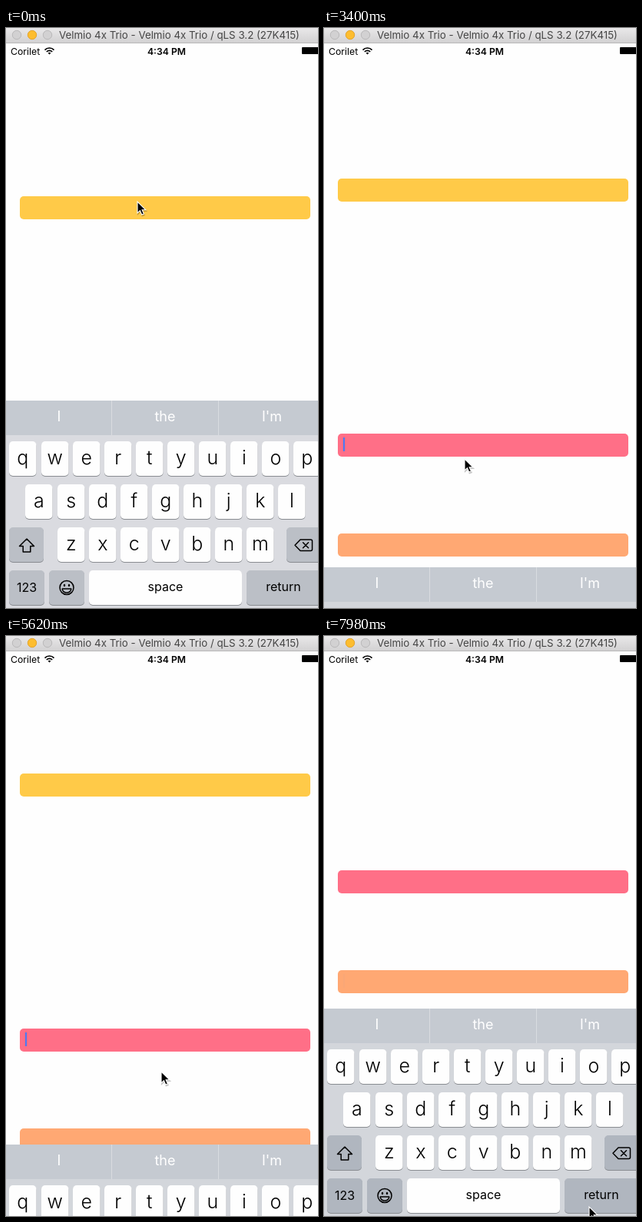
Recreate the animation shown at these times as an HTML page. Size 406 px wide and 755 px high, loop 8000 ms.

```html
<!DOCTYPE html>
<html lang="en">
<head>
<meta charset="utf-8">
<style>
  html, body { margin: 0; width: 100%; height: 100%; overflow: hidden; background: #fefefe; }
  svg { display: block; font-family: Inter, "Liberation Sans", sans-serif; }
  .mid { text-anchor: middle; }
  .letter { font-size: 25px; font-weight: 300; }
  .label { font-size: 16px; }
  .hint { font-size: 18px; fill: #fff; }
  .line { fill: none; stroke: #000; stroke-width: 1.5; stroke-linejoin: round; stroke-linecap: round; }
  #keys { --bg: #d3d6db; --dark: #b0b6bf; }
  #keys.light { --bg: #dadbe0; --dark: #bbbfc6; }
  .bg { fill: var(--bg); }
  .dark { fill: var(--dark); }
</style>
</head>
<body>
<svg width="406" height="755" viewBox="0 0 406 755">
  <defs>
    <linearGradient id="chrome" x2="0" y2="1">
      <stop stop-color="#e9e8e9"/><stop offset="1" stop-color="#d1d0d1"/>
    </linearGradient>
  </defs>
  <rect width="406" height="755" fill="#fefefe"/>

  <g id="page">
    <rect x="18" y="219" width="378" height="30" rx="5" fill="#ffca48"/>
    <rect x="18" y="551" width="378" height="30" rx="5" fill="#ff6f87"/>
    <rect x="18" y="681" width="378" height="30" rx="5" fill="#ffa873"/>
    <rect id="caret" x="25" width="2" height="18" fill="#4a78f4"/>
  </g>

  <g id="keys"></g>

  <!-- status bar -->
  <text x="6" y="35" font-size="12.3">Corilet</text>
  <g fill="none" stroke="#000" stroke-width="1.7">
    <path d="M50.5 28.6a8.2 8.2 0 0 1 12 0M52.8 31a5.2 5.2 0 0 1 7.4 0"/>
    <path d="M54.6 32.6a2.8 2.8 0 0 1 3.8 0l-1.9 2z" fill="#000" stroke="none"/>
  </g>
  <text x="209" y="35" class="mid" font-size="12.2" font-weight="600">4:34 PM</text>
  <rect x="385" y="25" width="23" height="9" rx="1"/>

  <!-- window title -->
  <rect width="406" height="20" fill="url(#chrome)"/>
  <rect y="19" width="406" height="1" fill="#b9b8b9"/>
  <g fill="#d2d1d2" stroke="#bab9ba">
    <circle cx="14" cy="9" r="5.7"/>
    <circle cx="34" cy="9" r="5.7" fill="#fdbd2f" stroke="#e3a32a"/>
    <circle cx="54" cy="9" r="5.7"/>
  </g>
  <text x="69" y="14" font-size="13.3" fill="#454545">Velmio 4x Trio - Velmio 4x Trio / qLS 3.2 (27K415)</text>

  <g id="mouse">
    <path d="M0 0v14.8l3.4-3.1 2.3 5.3 2.7-1.1-2.3-5.2h4.6z" opacity=".22" transform="translate(.6 1.6)" stroke="#000" stroke-width="1.5"/>
    <path d="M0 0v14.8l3.4-3.1 2.3 5.3 2.7-1.1-2.3-5.2h4.6z" stroke="#fff" stroke-width="1.1"/>
  </g>
</svg>
<script>
const $ = id => document.getElementById(id);
const LOOP = 8000, STEP = 147.8, KEYBOARD = 270;

// The keyboard is laid out at its raised position.
const text = (x, y, cls, s) => `<text x="${x}" y="${y}" class="mid ${cls}">${s}</text>`;
const key = (x, y, w, dark) =>
  `<rect x="${x}" y="${y + 1}" width="${w}" height="45" rx="5" fill="#898c91"/>` +
  `<rect x="${x}" y="${y}" width="${w}" height="45" rx="5" ${dark ? 'class="dark"' : 'fill="#fefefe"'}/>`;

function letterRow(letters, left, y) {
  return [...letters].map((c, i) => {
    const x = Math.round(left + i * 41.1);
    return key(x, y, 35.5, false) + text(x + 17.8, y + 29.5, "letter", c);
  }).join("");
}

$("keys").innerHTML =
  `<rect y="485" width="406" height="270" class="bg"/>
   <rect y="485" width="406" height="45" fill="#c5cad1"/>
   <path d="M137.5 485v45M276.5 485v45" stroke="#d9dce0"/>` +
  text(69, 512, "hint", "I") + text(207, 512, "hint", "the") + text(346, 512, "hint", "I'm") +
  letterRow("qwertyuiop", 4.45, 538) + letterRow("asdfghjkl", 25.45, 594) + letterRow("zxcvbnm", 66.55, 650) +
  key(4, 650, 45, true) + key(365, 650, 46, true) +
  key(4, 706, 46, true) + key(56, 706, 46, true) + key(108, 706, 199, false) + key(313, 706, 98, true) +
  text(27, 734, "label", "123") + text(207.5, 733, "label", "space") + text(361, 733, "label", "return") +
  `<path class="line" d="M27 665l9.5 9.5h-4.7v7.5h-9.6v-7.5h-4.7z"/>
   <path class="line" d="M383 666h13.5a2 2 0 0 1 2 2v10.5a2 2 0 0 1-2 2h-13.5l-7-7.2zM386.5 669.8l7 7m0-7l-7 7"/>
   <circle class="line" cx="79" cy="728.5" r="9"/>
   <path class="line" d="M73.2 730h11.6a5.8 5.2 0 0 1-11.6 0z"/>
   <ellipse cx="76" cy="725.5" rx="1.2" ry="1.8"/><ellipse cx="82" cy="725.5" rx="1.2" ry="1.8"/>`;

// y: resting top of the focused bar, lift: how far the page scrolls for it
const yellow = { y: 219, lift: 0 }, pink = { y: 551, lift: 116 }, orange = { y: 681, lift: 246 };
const sessions = [
  { show: -660, hide: 680, bar: yellow },
  { show: 1530, hide: 2250, bar: yellow },
  { show: 3345, hide: 4638, bar: pink },
  { show: 5535, hide: 6540, bar: pink },
  { show: 7325, hide: 9000, bar: orange },
];

// Pointer stops: time, x, y
const stops = [
  [0, 171, 226], [110, 171, 226], [560, 345, 718], [700, 345, 718],
  [1175, 171, 229], [1600, 171, 229], [2069, 352, 684], [2190, 350, 722], [2330, 350, 722],
  [3250, 183, 561], [3500, 183, 561], [4250, 205, 340], [4780, 205, 340],
  [5450, 202, 567], [5700, 202, 567], [6300, 212, 360], [6580, 212, 360],
  [7090, 233, 691], [7400, 233, 691], [7980, 345, 743],
];

const clamp = v => Math.min(1, Math.max(0, v));
const smooth = v => v * v * (3 - 2 * v);

// Critically damped spring from 0 to 1
function spring(ms) {
  const k = Math.max(0, ms) * 0.015;
  return 1 - Math.exp(-k) * (1 + k);
}

function blink(ms) {
  const phase = ms % 1000;
  return phase < 800 ? clamp((660 - phase) / 160) : clamp((phase - 850) / 150);
}

function pointer(t) {
  const i = Math.max(1, stops.findIndex(s => s[0] >= t));
  const [t0, x0, y0] = stops[i - 1], [t1, x1, y1] = stops[i];
  const p = smooth(clamp((t - t0) / (t1 - t0)));
  return [x0 + (x1 - x0) * p, y0 + (y1 - y0) * p];
}

function draw(t) {
  const { show, hide, bar } = sessions.filter(s => s.show <= t).pop();
  const up = spring(t - show) - spring(t - hide);
  const move = (id, x, y) => $(id).setAttribute("transform", `translate(${Math.round(x)} ${Math.round(y)})`);
  move("page", 0, -up * bar.lift);
  move("keys", 0, (1 - up) * KEYBOARD);
  move("mouse", ...pointer(t));
  $("keys").setAttribute("class", bar === yellow ? "light" : "");
  $("caret").setAttribute("y", bar.y + 5);
  $("caret").setAttribute("opacity", t < hide ? blink(t - show) : 0);
}

// The screen advances in even steps.
function frame(now) {
  const t = now % LOOP;
  draw(Math.min(7980, Math.floor((t + 5) / STEP) * STEP));
  requestAnimationFrame(frame);
}
draw(0);
requestAnimationFrame(frame);
</script>
</body>
</html>
```
